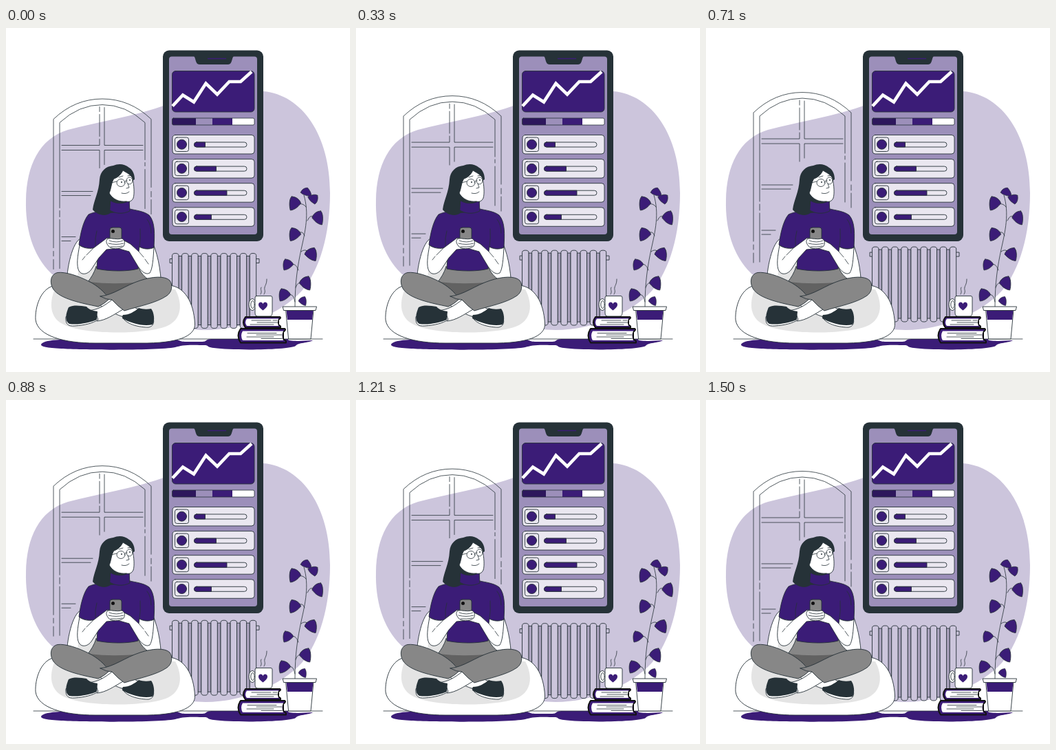
Write an HTML page that moves like this. It is 500 px wide and 500 px high and loops after 1540 ms.

```html
<!DOCTYPE html>
<html lang="en">
<head>
<meta charset="utf-8">
<style>
html, body { margin: 0; height: 100%; overflow: hidden; background: #fff; }
svg { display: block; width: 100%; height: 100%; }
.line { fill: none; stroke: #263238; stroke-width: .8; stroke-linecap: round; stroke-linejoin: round; }
.white { fill: #fff; }
.purple { fill: #3b1c77; }
.lilac { fill: #ccc5dc; }
.gray { fill: #878787; }
.dark { fill: #263238; }
.ink { stroke: #263238; stroke-width: .9; stroke-linejoin: round; stroke-linecap: round; }
.cover { fill: #3b1c77; stroke: #111; stroke-width: 2; stroke-linejoin: round; }
</style>
</head>
<body>
<svg viewBox="0 0 500 500">
  <path class="lilac" d="M29 250C30 200 48 161 90 148C135 136 185 129 235 111C290 94 335 89 374 92C430 97 471 155 471 240C471 300 456 352 430 382C400 414 345 439 290 439C230 439 120 400 66 357C38 330 28 290 29 250Z"/>

  <g class="float line">
    <path d="M69 320V133Q100 103.500 140 103.500T211 133V232M211 238V246M211 250V271M69 325V332M69 337V351"/>
    <path d="M78 262V138Q106 112 140 112T202 138V192M202 196V201M202 206V263M78 266V275M78 279V350"/>
    <path d="M81 171H136V162M136 158V126M136 122V115M81 178H136V204M143 116V171H199M199 178H143V199M81 238H126M81 244H123M81 304H101M81 310H94"/>
  </g>
  <g id="radiator" class="float"></g>

  <path class="purple" d="M51 460C54 453 80 452 130 452H242C252 452 250 456 262 456H284C294 456 288 452 300 452H410C408 456 430 455 446 454C440 458 424 457 421 462C412 468 330 469 302 465C288 463 298 461 285 461C265 460 255 461 246 464C220 469 110 468 80 466C60 465 50 463 51 460Z"/>
  <path class="line" d="M40 452H460"/>

  <g id="phone">
    <rect class="dark" x="228" y="32.500" width="146" height="277.500" rx="9"/>
    <rect x="237" y="41.500" width="128" height="258.500" rx="4" fill="#9c8fba"/>
    <path class="dark" d="M273 41H331C328 43 329 53 323 53H281C275 53 276 43 273 41Z"/>
    <path d="M293 44.500H320" stroke="#3b1c77" stroke-width="1.500"/>
    <rect class="purple ink" x="241.500" y="62.500" width="119.500" height="59.500" rx="5"/>
    <path d="M242 113.500L257 97.500L273 107.500L290.500 80.500L307 96.500L324.500 78H341L357 63.500" fill="none" stroke="#fff" stroke-width="4.600"/>
    <rect class="white" x="241.500" y="131" width="119.500" height="10" rx="2"/>
    <path d="M243 131H276V141H243Q241.500 141 241.500 139V133Q241.500 131 243 131" fill="#2d175c"/>
    <path d="M276 131H300V141H276Z" fill="#9c8fba"/>
    <path class="purple" d="M300 131H329V141H300Z"/>
    <rect class="line" x="241.500" y="131" width="119.500" height="10" rx="2"/>
  </g>

  <g id="plant">
    <path class="line" d="M420 405C420 370 424 345 429 322C435 295 441 270 433 243M436 260Q432 254 424 256M438 280Q443 269 448 276M434 302Q431 293 424 299M429 325Q435 320 440 326M425 352Q421 340 413 344M421 377Q424 368 432 370M420 398Q418 384 409 388"/>
  </g>
  <path class="white ink" d="M407 410H447L443 452H411Z"/>
  <path class="purple" d="M407.500 410H446.500L445 424H409Z"/>
  <path class="white ink" d="M402.500 405H451.500L450 410.500H404Z"/>

  <g id="books">
    <path class="cover" d="M348 420H398Q400 421 398 422.500L396 424V431L399 433.500V435.500H348Q342 428 348 420Z"/>
    <path class="white" d="M350 422.500H396Q394 428 396 433H350Q346 428 350 422.500Z"/>
    <path class="line" d="M357 425H385M365 428H395M355 431H389M388 425H394"/>
    <path class="cover" d="M341 437H405Q407 438 405 440L403 442V452L407 455V457.500H341Q334 447 341 437Z"/>
    <path class="white" d="M344 440.500H403Q400 447 403 454H344Q340 447 344 440.500Z"/>
    <path class="line" d="M351 443.500H393M364 446H401M350 449H389M371 451.500H401"/>
  </g>

  <g id="mug">
    <ellipse class="white ink" cx="358" cy="402" rx="5" ry="8.500"/>
    <ellipse class="white ink" cx="358.500" cy="402" rx="2.700" ry="5.500"/>
    <path class="white ink" d="M364 389.500H385Q387 389.500 387 392V414Q387 419 383 419H366Q362 419 362 414V392Q362 389.500 364 389.500Z"/>
    <path class="purple" d="M373.500 410.500C369 407 367 405 367 402C367 398 372 397 373.500 401C375 397 380 398 380 402C380 405 378 407 373.500 410.500Z"/>
    <path class="line" d="M379 365C379 372 377 373 376 377S378 382 375 387M371 377C369 381 373 382 370 387"/>
  </g>

  <g id="seat">
    <path class="white ink" d="M88 375C88 350 96 310 110 305H210C220 325 225 350 226 378Z"/>
    <path d="M104 367C104 348 109 340 122 345L133 335V367Z" fill="#e4e4e4"/>
    <path class="white ink" d="M68 375C50 380 42 406 43 424C46 448 85 458 130 458H205C258 457 275 445 274.500 430C273 398 259 376 238 374Z"/>
    <path d="M70 382C63 400 64 421 82 430C110 446 200 446 232 434C258 424 256 398 246 380Z" fill="#e4e4e4"/>
  </g>

  <g id="legs">
    <path class="gray ink" d="M131 347H192C196 355 200 362 210 367L160 392L118 370C124 363 128 356 131 347Z"/>
    <path d="M122 369C145 372 170 372 196 369L168 387L146 388Z" fill="#626262"/>
    <path class="white ink" d="M132 399L151 391L198 411L186 425C166 419 146 412 132 399Z"/>
    <path class="gray ink" d="M122 369C105 360 86 354 75 355.500C64 358 63 371 69 380C79 394 110 400 134 405Q143 401 150 394C143 383 133 375 122 369Z"/>
    <path class="white ink" d="M154 395L170 409C156 417 145 425 132 426L118 411C134 410 144 403 154 395Z"/>
    <path class="gray ink" d="M137 390C157 388 173 374 195 367C213 361 231 360 238 367C243 374 241 384 234 389C218 400 194 404 172 411Q163 405 154 395Q146 395 137 390Z"/>
    <path class="white ink" d="M87 420C86 430 90 434 100 433C115 432 126 429 134 424L132 418Z"/>
    <path class="dark" d="M91 406C99 402 109 404 117 405C121 410 128 411 133 412L132 424C122 428 106 432 92 430C84 425 88 413 91 406Z"/>
    <path class="white ink" d="M169 419C171 428 188 435 207 435C214 434 216 428 214 422Z"/>
    <path class="dark" d="M170 417C179 417 187 412 193 407C199 409 205 409 211 408C215 413 217 425 213 431C199 434 181 429 169 422Z"/>
  </g>

  <g id="body">
    <path class="purple ink" d="M152 264C140 266 128 267 120 271C112 280 108 300 106 315C112 320 120 321 127 320L134 317L132 350C150 354 178 354 192 350L194 318C200 322 210 322 215 319C216 300 217 282 208 272C200 266 188 265 180 263Z"/>
    <path class="line" d="M132 295Q129 305 130 316M195 292Q196 306 194 318M205 278Q211 285 211 298"/>
    <path class="white ink" d="M107 316C104 331 102 346 106 353C110 360 119 358 124 351L135 334L146 322L165 320L160 307L147 305L127 320C120 321 113 320 107 316Z"/>
    <path class="white ink" d="M215 319C214 336 213 350 209 356C203 360 195 352 191 345L179 325L158 319L168 307L181 314L193 325L194 318C200 322 210 322 215 319Z"/>
    <path class="line" d="M126 321L117 330M115 332L111 337M193 325L200 333M202 336L207 343"/>
    <rect class="gray ink" x="151" y="290" width="17" height="22" rx="3"/>
    <circle cx="155.500" cy="295.500" r="2.500" fill="#111"/>
    <path class="white ink" d="M148 306C154 305 161 308 168 306C172 307 174 312 171 317C165 322 153 322 149 317C145 312 145 309 148 306Z"/>
    <path class="line" d="M150 309Q161 313 170 309M149 313Q160 316 171 313M152 318Q161 319 169 317"/>
  </g>

  <g id="head">
    <path class="dark" d="M156 200C145 201 137 208 136 220C135 239 128 249 126 264C132 271 143 275 152 269L178 266L180 250L184 222L187 220C187 211 183 205 179 203C172 197 163 197 156 200Z"/>
    <path class="purple ink" d="M152 251C160 256 171 256 179 251L180 266C170 271 159 270 151 265Z"/>
    <path class="white ink" d="M150 240C153 234 153 224 157 219C164 217 168 211 170 207C174 210 181 212 184 219C186 228 187 241 185 247C183 252 179 253 175 252C164 253 155 249 150 240Z"/>
    <path class="line" d="M153 225L161 223M172 224Q174 221 176 222M177 226L179 232L175 233M168 240Q175 242 179 238M164 217L170 215M177 215L182 214"/>
    <ellipse class="line" cx="167" cy="225" rx="6" ry="5.500"/>
    <ellipse class="line" cx="179.500" cy="222" rx="4.500" ry="5"/>
    <circle class="dark" cx="168" cy="224" r="1"/>
    <circle class="dark" cx="180" cy="221" r="1"/>
  </g>
</svg>
<script>
const add = (id, markup) => document.getElementById(id).insertAdjacentHTML('beforeend', markup);

// Account cards on the big phone
[16.5, 32.5, 48, 25.5].forEach((amount, i) => {
  const y = 155.5 + 35.1 * i;
  add('phone', `<g class="ink" fill="#eae7f0">
    <rect x="242" y="${y}" width="119" height="27.500" rx="4"/>
    <rect x="245.500" y="${y + 3.5}" width="20" height="20.500" rx="3"/>
    <circle class="purple" cx="255.500" cy="${y + 13.7}" r="7"/>
    <rect x="273.500" y="${y + 10.5}" width="76.500" height="7" rx="3.500"/>
    <path class="purple" d="M277 ${y + 10.5}H${273 + amount}v7H277a3.500 3.500 0 0 1 0-7Z"/></g>`);
});

// Radiator: pipe ends, then columns with darker gaps
add('radiator', '<path class="lilac ink" d="M238.500 336H368V342H238.500ZM238.500 422H368V428H238.500Z"/>');
for (let i = 0; i < 9; i++) {
  const x = 241.5 + 14.1 * i;
  if (i < 8) add('radiator', `<path class="ink" d="M${x + 9.5} 332h4.600v100h-4.600Z" fill="#aaa2bd"/>`);
  add('radiator', `<path class="lilac ink" d="M${x} 331q0-3 4.700-3t4.700 3v103q0 3-4.700 3t-4.700-3Z"/>`);
}

// Leaves: x, y, horizontal scale (negative faces left), vertical scale, turn
[[420, 255, .95, 1], [453, 276, -.9, 1], [420, 300, .95, .95], [443, 329, -1, .95],
 [410, 344, .85, .8], [435, 371, -.95, 1], [405, 388, .95, .9], [431, 397, -.65, .65],
 [437, 238, .65, .8, -75], [447, 249, .8, .7, 75]].forEach(([x, y, sx, sy, turn = 0]) =>
  add('plant', `<path class="purple ink" transform="translate(${x} ${y}) rotate(${turn}) scale(${sx} ${sy})"
    d="M-5 -10C2 -10 8 -5 9 0C5 4 1 9 -7 10C-9 4 -9 -7 -5 -10Z"/>`));

// A steady rise and fall of 10 px that settles briefly before the loop restarts
const LOOP = 1540, PEAK = 715, HALF = 750, LIFT = 10;
const floating = document.querySelectorAll('.float');
const start = performance.now();
function draw() {
  const time = (performance.now() - start) % LOOP;
  const rise = LIFT * Math.max(0, 1 - Math.abs(time - PEAK) / HALF);
  floating.forEach(el => el.setAttribute('transform', `translate(0 ${-rise})`));
  requestAnimationFrame(draw);
}
draw();
</script>
</body>
</html>
```
